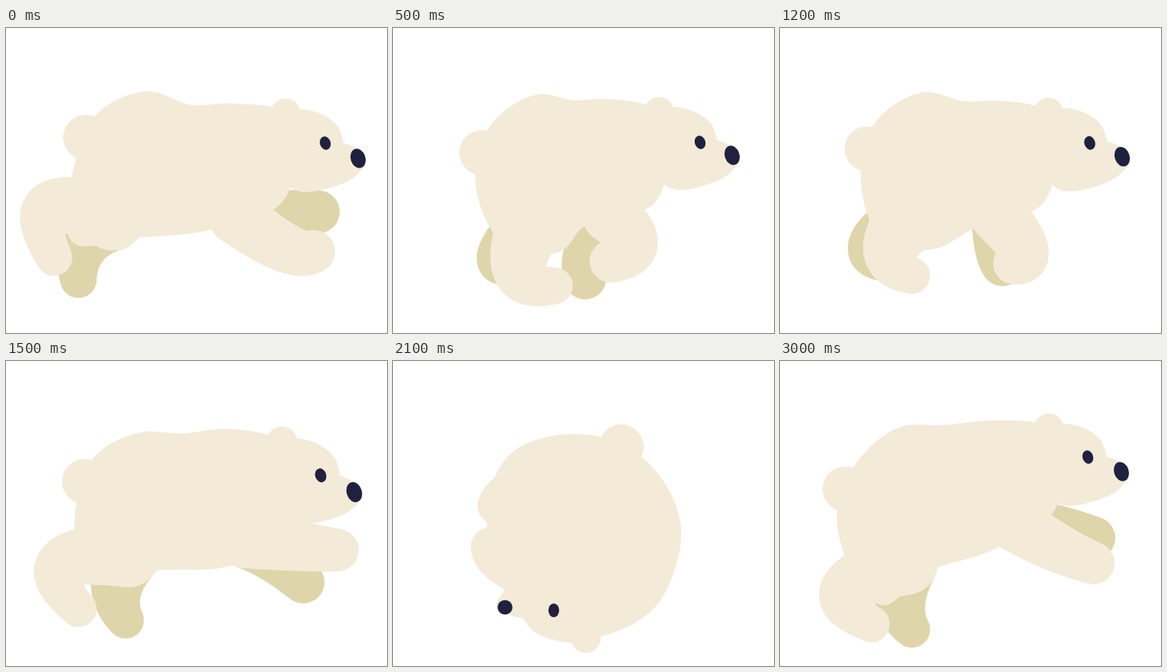
Write an HTML page with a canvas that moves like this. It is 500x400 px and loops after 3100 ms.

```html
<!DOCTYPE html>
<html lang="en">
<head>
<meta charset="utf-8">
<title>Polar bear</title>
<style>
  html, body { margin: 0; width: 100%; height: 100%; overflow: hidden; background: #fff; }
  canvas { display: block; width: 500px; height: 400px; }
</style>
</head>
<body>
<canvas width="500" height="400"></canvas>
<script>
const LOOP = 3100, STEP = 100, PIVOT = [240, 215];
const NEAR = '#f3ead8', FAR = '#dfd5aa', DARK = '#20213f';

// A pose is a handful of joints; the drawing rules below do the rest.
// back: tail root, hump, dip, withers      belly: throat, armpit, groin, thigh, rump
// face: ear, eye, nose                     hips: hip, shoulder
// near, far: knee, hind paw, elbow, front paw
const fly = {
  turn: 0, curl: 0,
  back: [117,115, 188,83, 244,101, 290,99],
  belly: [366,224, 262,266, 172,275, 90,283, 92,172],
  face: [367,112, 419,151, 462,171],
  hips: [140,250, 303,247],
  near: [56,236, 63,301, 366,288, 404,293],
  far: [103,283, 95,330, 375,245, 410,241]
};
const reach = {
  turn: 0, curl: 0,
  back: [115,115, 182,76, 265,101, 295,102],
  belly: [352,228, 252,275, 168,279, 125,288, 100,172],
  face: [362,114, 417,153, 461,174],
  hips: [122,230, 298,255],
  near: [73,224, 56,285, 335,318, 373,316],
  far: [60,245, 79,300, 380,270, 412,259]
};
const gather = {
  turn: 0, curl: 0,
  back: [125,132, 192,87, 240,95, 270,93],
  belly: [345,228, 246,264, 225,290, 150,286, 108,195],
  face: [349,110, 403,150, 445,167],
  hips: [175,268, 285,245],
  near: [168,324, 212,338, 315,283, 286,306],
  far: [143,300, 150,310, 257,292, 252,328]
};
const push = {
  turn: 0, curl: 0,
  back: [114,128, 180,93, 230,95, 290,89],
  belly: [388,212, 303,266, 180,277, 114,293, 92,188],
  face: [362,106, 413,150, 457,172],
  hips: [160,255, 315,235],
  near: [72,268, 95,325, 385,243, 435,248],
  far: [145,300, 157,340, 352,258, 390,290]
};
const tuck = {
  turn: 110, curl: 1,
  back: [325,125, 378,220, 371,270, 348,318],
  belly: [145,300, 125,225, 122,200, 150,126, 274,100],
  face: [253,363, 211,327, 147,323],
  hips: [200,180, 200,278],
  near: [160,175, 135,190, 152,265, 130,245],
  far: [170,185, 150,190, 165,265, 145,255]
};
const sit = {
  turn: 278, curl: 1,
  back: [150,337, 100,250, 98,205, 110,160],
  belly: [284,140, 320,222, 319,242, 311,344, 203,367],
  face: [172,75, 226,89, 304,88],
  hips: [270,300, 270,184],
  near: [310,297, 341,262, 312,185, 335,194],
  far: [305,260, 330,245, 308,165, 338,180]
};
const leap = {
  turn: 360, curl: 0,
  back: [96,140, 160,86, 215,84, 280,78],
  belly: [362,193, 279,248, 190,279, 140,320, 75,196],
  face: [353,88, 404,126, 448,145],
  hips: [165,265, 311,214],
  near: [85,302, 120,345, 360,243, 411,265],
  far: [158,315, 173,352, 365,222, 412,232]
};

const stride = [[0, fly], [100, reach], [500, gather], [700, push]];
const keys = [
  ...stride,
  ...stride.map(([t, pose]) => [t + 800, pose]),
  [1600, fly], [1700, reach], [2100, tuck], [2700, sit], [3000, leap],
  [LOOP, { ...fly, turn: 360 }]
];

// Head outline along the line from the ear (0) to the nose (HEAD).
const HEAD = 112;
const skull = [[6, -9], [40, -24], [68, -21], [85, -7], [102, -10], [123, -3],
  [122, 19], [104, 49], [62, 79], [19, 59]];

const ctx = document.querySelector('canvas').getContext('2d');
const mix = (a, b, k) => a + (b - a) * k;
const mixAll = (a, b, k) => a.map((v, i) => mix(v, b[i], k));
const rad = deg => deg * Math.PI / 180;

function rotate([x, y], angle) {
  const c = Math.cos(angle), s = Math.sin(angle);
  return [x * c - y * s, x * s + y * c];
}

// Points seen from the pivot, with the pose's own turn taken out.
function upright(pose, part) {
  const list = pose[part], out = [];
  for (let i = 0; i < list.length; i += 2)
    out.push(rotate([list[i] - PIVOT[0], list[i + 1] - PIVOT[1]], -rad(pose.turn)));
  return out;
}

function blend(a, b, k) {
  const turn = rad(mix(a.turn, b.turn, k)), pose = { curl: mix(a.curl, b.curl, k) };
  for (const part of ['back', 'belly', 'face', 'hips', 'near', 'far']) {
    const to = upright(b, part);
    pose[part] = upright(a, part).map((p, i) => {
      const [x, y] = rotate(mixAll(p, to[i], k), turn);
      return [x + PIVOT[0], y + PIVOT[1]];
    });
  }
  return pose;
}

// Filled smooth loop; the optional corner index gets no handles.
function blob(pts, corner) {
  const n = pts.length, at = i => pts[(i + n) % n];
  const span = i => Math.max(0.01, Math.hypot(at(i + 1)[0] - at(i)[0], at(i + 1)[1] - at(i)[1]));
  const tangent = i => {
    if (i % n === corner) return [0, 0];
    const l1 = span(i - 1), l2 = span(i);
    return at(i).map((v, c) =>
      ((v - at(i - 1)[c]) * l2 / l1 + (at(i + 1)[c] - v) * l1 / l2) / (l1 + l2));
  };
  ctx.beginPath();
  ctx.moveTo(...pts[0]);
  for (let i = 0; i < n; i++) {
    const h = span(i) / 3, t1 = tangent(i), t2 = tangent(i + 1);
    ctx.bezierCurveTo(
      ...at(i).map((v, c) => v + t1[c] * h),
      ...at(i + 1).map((v, c) => v - t2[c] * h),
      ...at(i + 1));
  }
  ctx.fill();
}

function oval([x, y], rx, ry = rx, tilt = 0) {
  ctx.beginPath();
  ctx.ellipse(x, y, rx, ry, tilt, 0, 2 * Math.PI);
  ctx.fill();
}

// Tapered leg: discs along a parabola through root, joint and paw.
function limb(root, joint, paw, r0, r1) {
  const bend = joint.map((v, c) => 2 * v - (root[c] + paw[c]) / 2);
  ctx.beginPath();
  for (let i = 0; i <= 40; i++) {
    const k = i / 40, r = mix(r0, r1, k);
    const [x, y] = mixAll(mixAll(root, bend, k), mixAll(bend, paw, k), k);
    ctx.moveTo(x + r, y);
    ctx.arc(x, y, r, 0, 2 * Math.PI);
  }
  ctx.fill();
}

function legs([hip, shoulder], [knee, hindPaw, elbow, forePaw]) {
  limb(hip, knee, hindPaw, 42, 24);
  limb(shoulder, elbow, forePaw, 37, 28);
}

function head([ear, eye, nose], curl) {
  const dx = nose[0] - ear[0], dy = nose[1] - ear[1];
  const size = Math.hypot(dx, dy) / HEAD, axis = Math.atan2(dy, dx);
  const slim = 1 - 0.27 * curl, tilt = rad(-18 * (1 - curl));
  blob(skull.map(([x, y]) => {
    const p = rotate([x * size, y * size * slim], axis);
    return [p[0] + ear[0], p[1] + ear[1]];
  }), 3);
  oval(ear, 19.5 * size);
  ctx.fillStyle = DARK;
  oval(eye, 7 * size, 9 * size, tilt);
  oval(nose, 9.7 * size, 13 * size * slim, tilt);
}

function draw(t) {
  const i = keys.findIndex(([at]) => at > t);
  const [t0, a] = keys[i - 1], [t1, b] = keys[i];
  let k = (t - t0) / (t1 - t0);
  if (b === tuck) k = (k + k * k) / 2;
  const { back, belly, face, hips, near, far, curl } = blend(a, b, k);

  ctx.clearRect(0, 0, 500, 400);
  ctx.fillStyle = FAR;
  legs(hips, far);
  ctx.fillStyle = NEAR;
  oval(mixAll(back[0], belly[4], 0.5), 29.5);
  blob([...back, face[0], ...belly]);
  legs(hips, near);
  head(face, curl);
}

const start = performance.now();
function tick() {
  const t = (performance.now() - start) % LOOP;
  draw(Math.floor(t / STEP) * STEP);
  requestAnimationFrame(tick);
}
tick();
</script>
</body>
</html>
```
